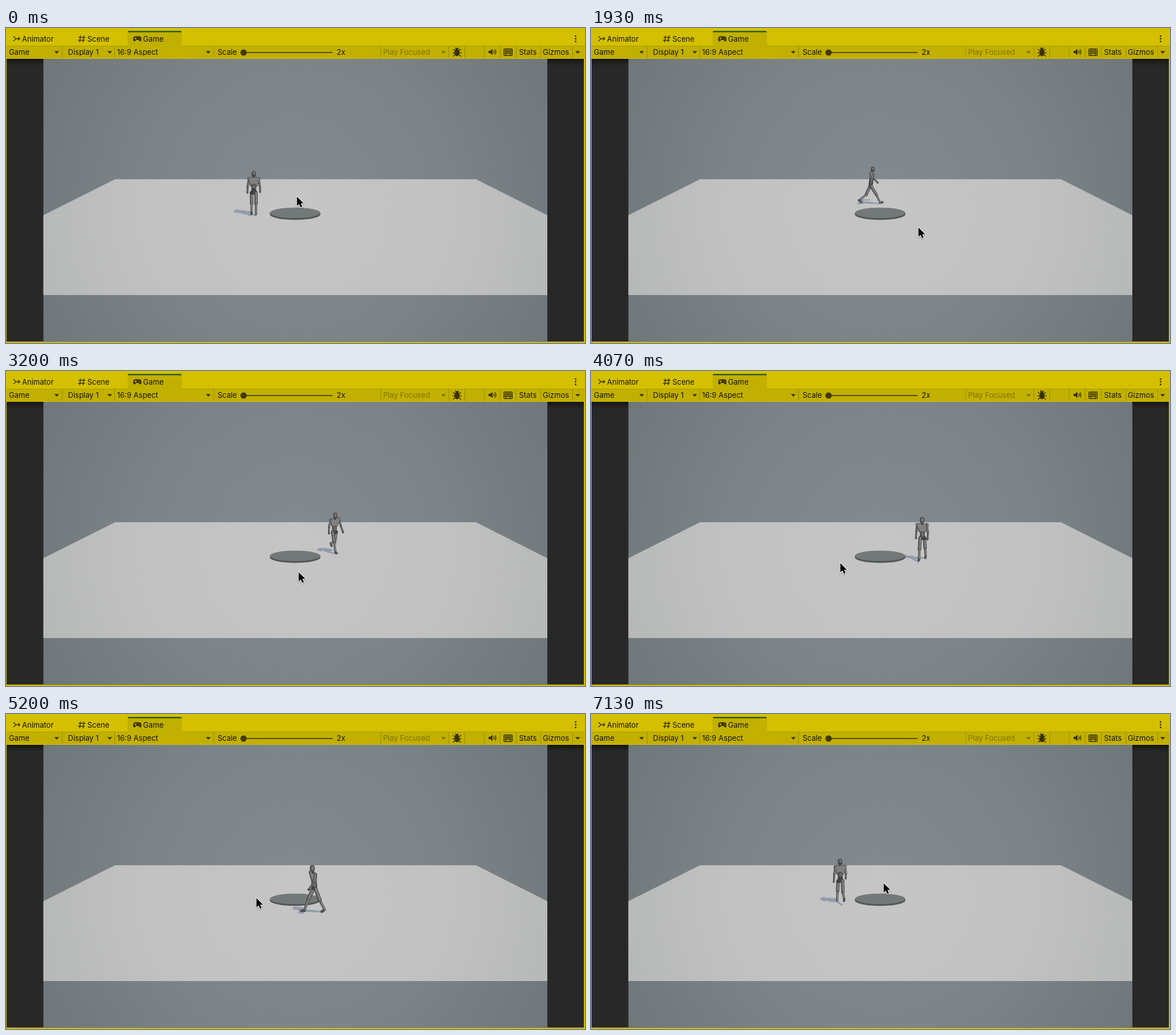
Write an HTML page with a canvas that moves like this. It is 1014 by 552 pixels and loops after 7.2 s.

```html
<!DOCTYPE html>
<html lang="en">
<head>
<meta charset="utf-8">
<title>Walk around</title>
<style>
  html, body { margin: 0; width: 100%; height: 100%; overflow: hidden; background: #282828; }
  svg, canvas { position: absolute; left: 0; top: 0; width: 1014px; height: 552px; }
  text { font: 13px Inter, sans-serif; fill: #151300; }
  .line { fill: none; stroke: #383200; stroke-width: 1.4; }
  .icon { fill: #383200; }
</style>
</head>
<body>
<svg viewBox="0 0 1014 552">
  <defs>
    <radialGradient id="sky" gradientUnits="userSpaceOnUse" cx="507" cy="300" r="520">
      <stop offset="0" stop-color="#838a8f"/>
      <stop offset=".5" stop-color="#7d8489"/>
      <stop offset="1" stop-color="#6e7679"/>
    </radialGradient>
    <radialGradient id="floor" gradientUnits="userSpaceOnUse" cx="507" cy="310" r="490">
      <stop offset="0" stop-color="#c5c5c5"/>
      <stop offset=".55" stop-color="#c1c1c1"/>
      <stop offset="1" stop-color="#b5b8b6"/>
    </radialGradient>
    <linearGradient id="shade" x2="0" y2="1">
      <stop offset="0" stop-color="#151515"/>
      <stop offset="1" stop-color="#282828"/>
    </linearGradient>
    <path id="caret" class="icon" d="M0 0h8.4l-4.2 4.6z"/>
  </defs>

  <rect width="1014" height="552" fill="#d4c000"/>
  <rect x="1" y="54" width="1011" height="495.500" fill="#282828"/>
  <rect x="1" y="54" width="1011" height="12" fill="url(#shade)"/>
  <rect x="65.500" y="54" width="882.500" height="495.500" fill="url(#sky)"/>
  <path d="M191 265H823L948 328V468H65.500V328Z" fill="url(#floor)"/>

  <rect x="1" y="31" width="1012" height="22" fill="#c2b000"/>
  <path d="M213 31V8q0-3 3-3h89q3 0 3 3v23z" fill="#c2b000"/>
  <path d="M213 8q0-3 3-3h89q3 0 3 3v-.5H213z" fill="#2f5c1c"/>
  <path d="M1 31.500H213M308 31.500H1013" stroke="#aa9a00"/>
  <path id="rules" stroke="#9a8c00"/>

  <g id="labels"></g>

  <path class="line" d="M13 14.500l4.500 4.200-4.500 4.200M17 18.700h7M21.300 16l2.800 2.700-2.800 2.700"/>
  <path class="line" d="M130.500 13l-1.500 12M136.500 13l-1.500 12M127 16.500h12M126 21.500h12"/>
  <path class="icon" d="M226.500 14.500h7q3.500 0 3.800 5 0 4-2 4-1.500 0-3-2.500h-4.600q-1.500 2.500-3 2.500-2 0-2-4 .3-5 3.800-5z"/>
  <path d="M225 18.300h4M227 16.300v4M232 17h1.500M234 19.500h1.500" stroke="#c2b000" stroke-width="1.200"/>
  <g class="icon">
    <circle cx="997.500" cy="14" r="1.500"/><circle cx="997.500" cy="18.700" r="1.500"/><circle cx="997.500" cy="23.400" r="1.500"/>
  </g>

  <use href="#caret" x="84.500" y="40.500"/>
  <use href="#caret" x="177.500" y="40.500"/>
  <use href="#caret" x="350" y="40.500"/>
  <use href="#caret" x="997" y="40.500"/>
  <use href="#caret" x="762" y="40.500" opacity=".5"/>

  <path d="M416 43H572" stroke="#5b5200" stroke-width="2"/>
  <circle cx="416" cy="43" r="5.500" fill="#40390a"/>

  <ellipse class="icon" cx="789.700" cy="43.500" rx="4.300" ry="6"/>
  <circle class="icon" cx="789.700" cy="38" r="3"/>
  <path class="line" d="M783 37l3 3h7.500l3-3M782 43.500h15.500M783 50l3-3.500h7.500l3 3.500M787 34l1.500 2.500M792.500 34l-1.500 2.500"/>
  <path class="icon" d="M845 40h3l4-3.500v11l-4-3.500h-3z"/>
  <path class="line" d="M854 39.500q2 2.500 0 5M856.300 37.500q3.500 4.500 0 9"/>
  <rect class="line" x="872" y="36.700" width="14.500" height="11.600" rx="1"/>
  <path class="line" d="M872 40.500h14M872 44.300h14M875.600 37v7.300M879.300 37v7.300M883 37v7.300M875.600 44v4M883 44v4"/>
</svg>
<canvas width="1014" height="552"></canvas>

<script>
const LOOP = 7200, STEP = 1000 / 15;
const ctx = document.querySelector('canvas').getContext('2d');

const labels = [
  ['Animator', 28, 23.5], ['Scene', 142.5, 23.5], ['Game', 240, 23.5],
  ['Game', 5, 47], ['Display 1', 108.5, 47], ['16:9 Aspect', 194.5, 47],
  ['Scale', 370.5, 47], ['2x', 579, 47], ['Play Focused', 660.5, 47, '#7d7200'],
  ['Stats', 898.5, 47], ['Gizmos', 940, 47]
];
document.getElementById('labels').innerHTML = labels.map(([s, x, y, color]) =>
  `<text x="${x}" y="${y}"${color ? ` style="fill:${color}"` : ''}>${s}</text>`).join('');
document.getElementById('rules').setAttribute('d',
  [98.5, 190.5, 363.5, 656.5, 775.5, 803.5, 837.5, 865.5, 893.5, 936.5, 992.5]
    .map(x => `M${x} 32V53`).join(''));

// time, degrees walked round the disc, distance from its centre
const walkKeys = [
  [0, 0, 73], [1930, 76, 71], [3200, 152, 77], [4070, 188, 74],
  [5200, 244, 76], [6130, 293.5, 68], [7130, 352, 71]
];
// time, x, y of the pointer tip
const pointerKeys = [
  [0, 509, 295], [350, 568, 299], [700, 597, 306], [1150, 583, 315], [1500, 577, 321],
  [1930, 573, 349], [2300, 562, 351], [3200, 512, 352], [3670, 463, 350],
  [4070, 436, 336], [4600, 436, 325], [5200, 438, 322], [5650, 426, 333],
  [6130, 411, 352], [6600, 510, 302], [7130, 512, 296]
];

// Smooth curve through the rows of a key table.
function sample(keys, t) {
  let i = 0;
  while (i < keys.length - 2 && t >= keys[i + 1][0]) i++;
  const a = keys[i], b = keys[i + 1], span = b[0] - a[0];
  const before = keys[i - 1] || a, after = keys[i + 2] || b;
  const u = Math.min(1, (t - a[0]) / span), v = 1 - u;
  return [1, 2].map(c => {
    const m0 = (b[c] - before[c]) / (b[0] - before[0]) * span;
    const m1 = (after[c] - a[c]) / (after[0] - a[0]) * span;
    return a[c] * (1 + 2 * u) * v * v + m0 * u * v * v +
           b[c] * u * u * (3 - 2 * u) - m1 * u * u * v;
  });
}

// Points are [forward, right, up] in units of body height.
const swing = ([f, s, u], len, angle, out = 0) =>
  [f + len * Math.sin(angle), s + out, u - len * Math.cos(angle)];

function legPose(side, phase) {
  const thigh = .5 * Math.cos(phase) + .05;
  const bend = .1 + .8 * Math.max(0, Math.sin(phase - Math.PI + .5));
  const hip = [0, side * .05, 0];
  const knee = swing(hip, .25, thigh);
  const ankle = swing(knee, .23, thigh - bend);
  const pitch = (thigh - bend) * .6;
  const toe = [ankle[0] + .07 * Math.cos(pitch), ankle[1], ankle[2] + .07 * Math.sin(pitch) - .012];
  return { hip, knee, ankle, toe, low: Math.min(ankle[2] - .03, toe[2] - .015) };
}

function bodyParts(phase) {
  const parts = [];
  const add = (w, dark, light, ...pts) => parts.push({ w, dark, light, pts });
  const legs = [1, -1].map(side => legPose(side, phase + (side < 0 ? Math.PI : 0)));
  const shoulders = [1, -1].map(side => [.035, side * .11, .31]);

  legs.forEach(({ hip, knee, ankle, toe }) => {
    add(.05, '#414141', '#595959', ankle, toe);
    add(.052, '#505050', '#858585', knee, ankle);
    add(.078, '#4f4f4f', '#808080', hip, knee);
    add(.05, '#3d3d3d', '#626262', knee, knee);
  });
  shoulders.forEach((joint, i) => {
    const side = i ? -1 : 1;
    const angle = -.42 * Math.cos(phase + i * Math.PI);
    const elbow = swing(joint, .17, angle, side * .028);
    const hand = swing(elbow, .16, angle + .35, side * .008);
    add(.05, '#474747', '#808080', joint, elbow);
    add(.042, '#424242', '#777', elbow, hand);
    add(.045, '#3f3f3f', '#555', hand, hand);
  });
  add(.075, '#343434', '#444', legs[0].hip, legs[1].hip, [0, 0, .06]);
  add(.11, '#4c4c4c', '#6c6c6c', [0, 0, .06], [.015, 0, .15]);
  add(.075, '#545454', '#808080', shoulders[0], shoulders[1], [.015, -.05, .17], [.015, .05, .17]);
  add(.05, '#3c3c3c', '#505050', [.035, 0, .33], [.045, 0, .39]);
  add(.1, '#4b4b4b', '#7b7b7b', [.05, 0, .4], [.05, 0, .435]);
  return { parts, lift: -Math.min(legs[0].low, legs[1].low) };
}

function trace(pts, width, color) {
  ctx.beginPath();
  pts.forEach(([x, y]) => ctx.lineTo(x, y));
  if (pts.length > 2) ctx.closePath();
  else ctx.lineTo(pts[1][0] + .01, pts[1][1]);
  ctx.lineWidth = width;
  ctx.strokeStyle = ctx.fillStyle = color;
  if (pts.length > 2) ctx.fill();
  ctx.stroke();
}

function drawDisc() {
  const slab = (y, color) => {
    ctx.fillStyle = color;
    ctx.beginPath();
    ctx.ellipse(506.3, y, 44, 9.2, 0, 0, 2 * Math.PI);
    ctx.fill();
  };
  slab(327.2, 'rgba(90,96,102,.4)');
  for (let y = 326.8; y > 324; y -= .5) slab(y, '#515655');
  slab(323.9, '#737979');
}

function drawWalker(t) {
  const [degrees, radius] = sample(walkKeys, t);
  const turn = degrees * Math.PI / 180, hx = Math.sin(turn), hz = Math.cos(turn);
  const depth = radius * hx;
  const gx = 507 - radius * hz, gy = 328 - .29 * depth;
  const size = 77 / (1 + .12 * depth / 73);
  const { parts, lift } = bodyParts((t - 1930) / 1120 * 2 * Math.PI);

  const away = ([f, s]) => f * hz - s * hx;
  const across = ([f, s]) => f * hx + s * hz;
  const onScreen = p => [gx + size * across(p), gy - size * (p[2] + lift + .24 * away(p))];
  const onGround = p => {
    const up = p[2] + lift;
    return [gx + size * (across(p) - .4 * up), gy - size * (.24 * away(p) + .1 * up)];
  };
  const distance = ({ pts }) => pts.reduce((sum, p) => sum + away(p), 0) / pts.length;

  ctx.lineCap = ctx.lineJoin = 'round';
  parts.forEach(({ pts, w }) => trace(pts.map(onGround), size * w * .6, '#929bab'));
  drawDisc();
  parts.sort((a, b) => distance(b) - distance(a));
  parts.forEach(({ pts, w, dark, light }) => {
    const flat = pts.map(onScreen);
    trace(flat, size * w, dark);
    trace(flat.map(([x, y]) => [x + .5, y - .3]), size * w * .5, light);
  });
}

const arrow = new Path2D('M0 0V16.500L3.800 13L6.300 18.800L9.200 17.500L6.700 11.800H11.800Z');
function drawPointer(t) {
  const [x, y] = sample(pointerKeys, t);
  ctx.save();
  ctx.translate(x + .5, y + .5);
  ctx.lineJoin = 'round';
  ctx.shadowColor = 'rgba(0,0,0,.35)';
  ctx.shadowBlur = 2;
  ctx.shadowOffsetY = 1;
  ctx.strokeStyle = '#fff';
  ctx.lineWidth = 2.2;
  ctx.stroke(arrow);
  ctx.shadowColor = 'transparent';
  ctx.fillStyle = '#000';
  ctx.fill(arrow);
  ctx.restore();
}

function render() {
  const t = Math.floor((performance.now() % LOOP + 4) / STEP) * STEP % LOOP;
  ctx.clearRect(0, 0, 1014, 552);
  drawWalker(t);
  drawPointer(t);
  requestAnimationFrame(render);
}
render();
</script>
</body>
</html>
```
